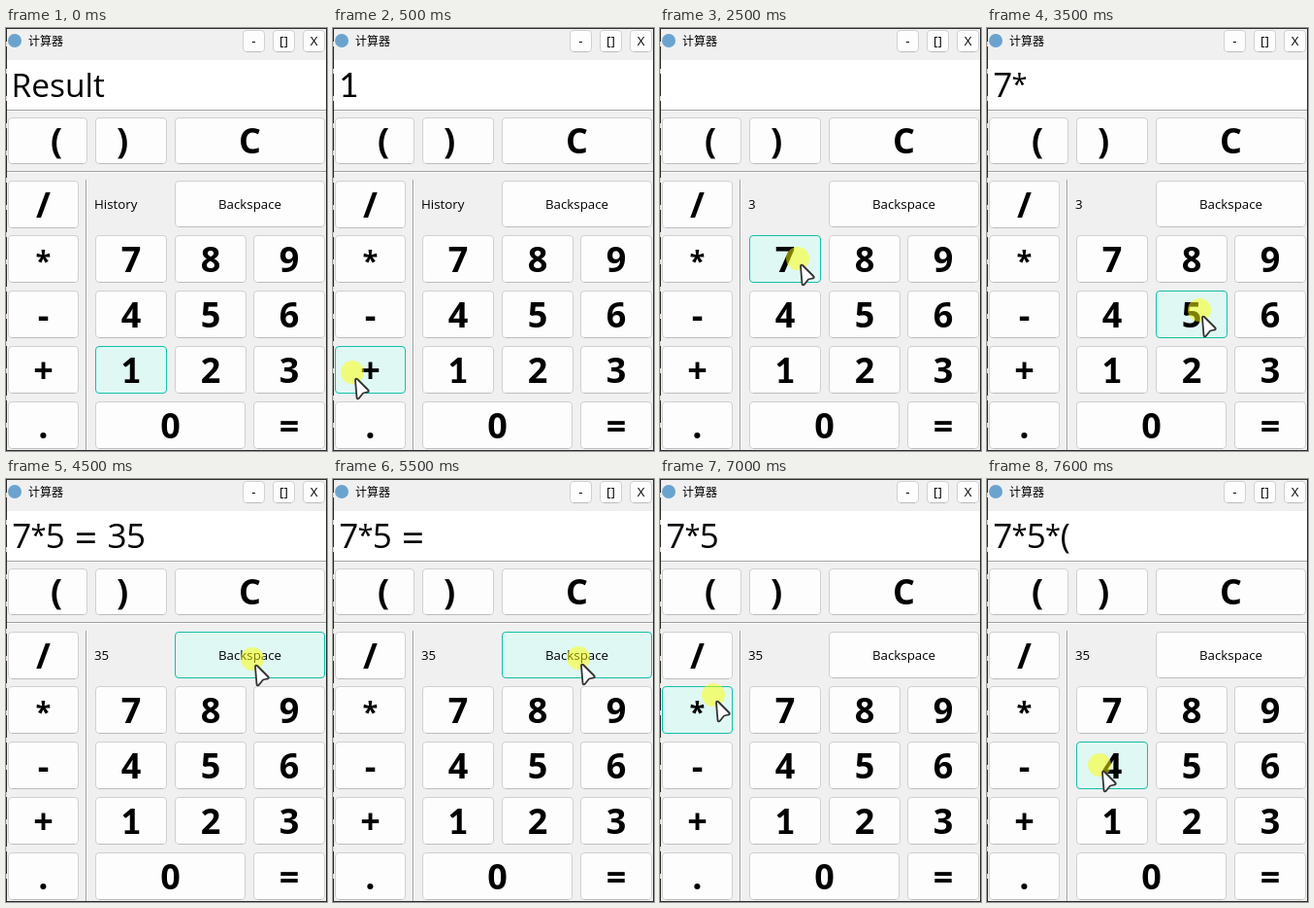
An HTML page that plays this animation: 331 by 435 pixels, repeating every 8 s.

```html
<!DOCTYPE html>
<html lang="zh">
<head>
<meta charset="utf-8">
<title>计算器</title>
<style>
html, body { margin: 0; width: 100%; height: 100%; overflow: hidden; background: #f0f0f0; }
svg { display: block; width: 100vw; height: 100vh; font-family: "Open Sans", "Noto Sans", sans-serif; }
text { white-space: pre; }
.key rect { fill: #fdfdfd; stroke: #d0d0d0; }
.key line { stroke: #bcbcbc; }
.key text { text-anchor: middle; }
.key.hot rect { fill: #dff8f4; stroke: #14bfa9; }
.key.hot line { stroke: #14bfa9; }
.big { font-weight: 700; font-size: 36px; }
.small { font-size: 13.3px; }
</style>
</head>
<body>
<svg id="stage" viewBox="0 0 331 435">
  <rect width="331" height="435" fill="#f0f0f0"/>
  <rect x="1" y="33" width="329" height="51" fill="#fff"/>
  <path d="M1 84.5H330M1 147.5H330M82.5 434V156" stroke="#a0a0a0"/>
  <path d="M1 85.5H330M1 148.5H330M83.5 434V156" stroke="#fff"/>
  <rect x=".5" y=".5" width="330" height="434" fill="none" stroke="#2c2c2c"/>
  <path d="M.5 14V434" stroke="#e4d9cc" stroke-dasharray="5 23"/>
  <circle cx="9" cy="13" r="7" fill="#6ba3cf"/>
  <text x="23" y="17.5" font-size="12" font-family="Noto Sans CJK SC, Noto Sans CJK, sans-serif">计算器</text>
  <g id="keys"></g>
  <text id="history" class="small" x="91" y="186"></text>
  <text id="display" y="71"></text>
  <g id="pointer">
    <circle id="press" r="12" fill="#ff0" fill-opacity=".5"/>
    <path d="M3 8Q3 6 5 7L16 18Q18 20 15 20.5L11 21.5L7 26.5Q5 28.5 4.500 26Z" fill="#fff" stroke="#333" stroke-width="1.8" stroke-linejoin="round"/>
  </g>
</svg>
<script>
const $ = id => document.getElementById(id);
const NS = 'http://www.w3.org/2000/svg';
const keys = {};

function add(parent, tag, attrs, text = '') {
  const el = document.createElementNS(NS, tag);
  for (const name in attrs) el.setAttribute(name, attrs[name]);
  el.textContent = text;
  parent.append(el);
  return el;
}

function addKey(label, x, y, right, bottom, { dx = 0, dy = 13, cls = 'big', style = '' } = {}) {
  const g = add($('keys'), 'g', { class: 'key' });
  add(g, 'rect', { x: x + .5, y: y + .5, width: right - x - 1, height: bottom - y - 1, rx: 3.5 });
  add(g, 'line', { x1: x + 4, x2: right - 4, y1: bottom - .5, y2: bottom - .5 });
  add(g, 'text', { x: (x + right) / 2 + dx, y: (y + bottom) / 2 + dy, class: cls, style }, label);
  keys[label] = g;
}

const small = { cls: 'small', dy: 4.5 };
addKey('-', 244, 2, 267, 25, small);
addKey('[]', 275, 2, 298, 25, small);
addKey('X', 306, 2, 329, 25, small);
addKey('(', 2, 92, 84, 140, { dx: 9 });
addKey(')', 92, 92, 166, 140, { dx: -9 });
addKey('C', 174, 92, 329, 140);
addKey('Backspace', 174, 157, 329, 205, small);

const rows = [157, 213, 270, 327, 384], cols = [92, 174, 255];
const footed = 'font-family: Lato, sans-serif; font-weight: 800';
['/', '*', '-', '+', '.'].forEach((label, i) => addKey(label, 2, rows[i], 75, rows[i] + 49,
  label === '*' ? { dy: 12, style: 'font-size: 29px' } : {}));
for (let n = 1; n < 10; n++) {
  const x = cols[(n - 1) % 3], y = rows[3 - Math.floor((n - 1) / 3)];
  addKey(String(n), x, y, x + 74, y + 49, n === 1 ? { style: footed } : {});
}
addKey('0', 92, 384, 247, 433);
addKey('=', 255, 384, 329, 433);

// Display glyphs: advance, font size, baseline shift
const glyphs = { '*': [15, 29, -3], '+': [24.6, 41, 5], '=': [24.6, 41, 4], ' ': [9.9, 34, 0], '(': [10.9, 34, 0] };

function showText(text) {
  const out = $('display');
  out.textContent = '';
  if (text === 'Result') {
    add(out, 'tspan', { x: 5.5, 'font-size': 33.5 }, text);
    return;
  }
  let x = 6.6;
  for (const ch of text) {
    const [advance, size, shift] = glyphs[ch] || [19.4, 35, 0];
    if (ch !== ' ') add(out, 'tspan', {
      x: x + advance / 2, y: 71 + shift, 'font-size': size, 'text-anchor': 'middle',
      'font-family': ch === '1' ? 'Lato, sans-serif' : 'Open Sans, sans-serif'
    }, ch);
    x += advance;
  }
}

// start ms, display, history, hovered key, pointer x, pointer y, button released
const steps = [
  [0, 'Result', 'History', '1'],
  [500, '1', 'History', '+', 20, 354],
  [1000, '1+', 'History', '2', 206, 349],
  [1500, '1+2', 'History', '=', 282, 398],
  [2000, '1+2 = 3', '3', 'C', 250, 116],
  [2500, '', '3', '7', 142, 237],
  [3000, '7', '3', '*', 48, 236],
  [3500, '7*', '3', '5', 219, 290],
  [4000, '7*5', '3', '=', 288, 402],
  [4500, '7*5 = 35', '35', 'Backspace', 254, 185],
  [5000, '7*5 = 3', '35', 'Backspace', 253, 184, true],
  [5500, '7*5 = ', '35', 'Backspace', 253, 184],
  [6000, '7*5 =', '35', 'Backspace', 253, 184, true],
  [6500, '7*5 ', '35', 'Backspace', 253, 184],
  [7000, '7*5', '35', '*', 55, 222],
  [7100, '7*5*', '35', '(', 50, 118],
  [7600, '7*5*(', '35', '4', 116, 294]
];
let current;

function show(step) {
  const [, text, history, hot, x, y, released] = step;
  showText(text);
  $('history').textContent = history;
  for (const label in keys) keys[label].classList.toggle('hot', label === hot);
  $('pointer').setAttribute('visibility', x ? 'visible' : 'hidden');
  $('pointer').setAttribute('transform', `translate(${x || 0} ${y || 0})`);
  $('press').setAttribute('opacity', released ? 0 : 1);
}

function frame(now) {
  const t = now % 8000;
  const step = steps.findLast(s => s[0] <= t) || steps[0];
  if (step !== current) show(current = step);
  requestAnimationFrame(frame);
}
frame(0);
</script>
</body>
</html>
```
